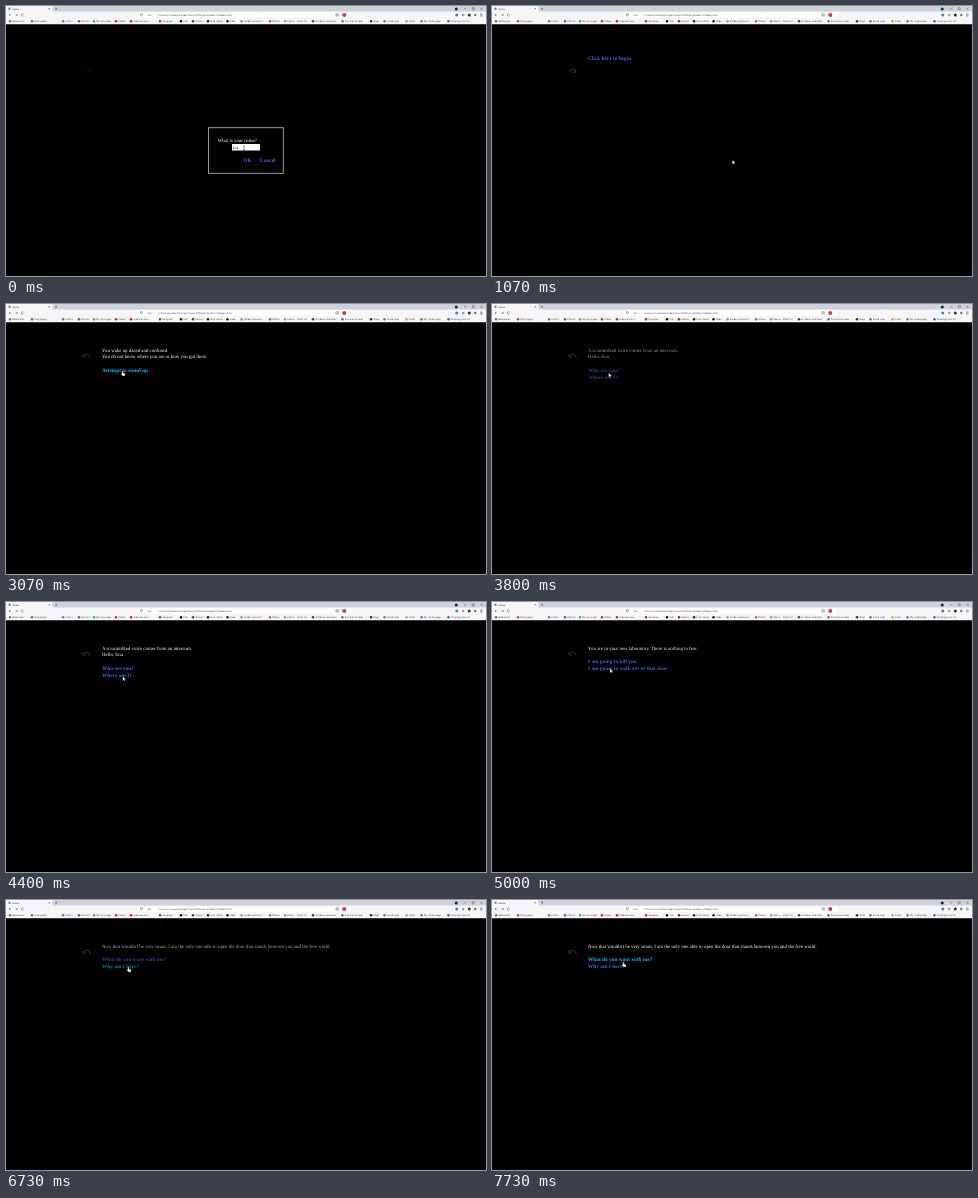
An HTML page for the animation above (8000 ms loop, 480 by 270 pixels).

```html
<!DOCTYPE html>
<html lang="en">
<head>
<meta charset="utf-8">
<style>
html, body { margin: 0; width: 100%; height: 100%; overflow: hidden; background: #000; }
svg { display: block; width: 100%; height: 100%; text-rendering: geometricPrecision; }
.story { font: 19.5px "Liberation Serif", serif; fill: #fff; }
.link { font-size: 21.4px; font-weight: bold; fill: #4169e1; }
.hover { fill: #00bfff; }
.ui { font: 9.3px Inter, sans-serif; fill: #444; }
.line { fill: none; stroke: #555; stroke-width: 2; }
.icon { fill: none; stroke: #484848; stroke-width: 2.6; }
</style>
</head>
<body>
<svg viewBox="0 0 1920 1080">
  <rect width="1920" height="1080"/>
  <g class="ui" id="browser">
    <rect width="1920" height="24" fill="#d0d0dc"/>
    <rect width="186" height="24" fill="#f6f6f9"/>
    <rect y="22" width="1920" height="51" fill="#f6f6f9"/>
    <rect x="528" y="26" width="852" height="21" rx="4" fill="#fff"/>
    <circle cx="14" cy="11" r="5" fill="#889"/>
    <text x="24" y="15">Hollow</text>
    <path class="line" d="M170 8l6 6m0-6l-6 6M196 11h9m-4.500-4.500v9M1832 11h9M1865 7h8v8h-8zM1898 7l8 8m0-8l-8 8"/>
    <circle cx="1801" cy="12" r="6" fill="#222"/>
    <path class="line" d="M20 36h-8m4-4l-4 4 4 4M38 36h8m-4-4l4 4-4 4M70 33a5 5 0 1 0 0 6M538 31h7v6l-3.500 4-3.500-4z"/>
    <text x="566" y="40">File</text>
    <text x="608" y="40">C:/Users/marlow/Desktop/Twine%20Stories/Hollow%20Room.html</text>
    <path class="line" d="M1320 31h9v10l-4.500-3-4.500 3z"/>
    <circle cx="1353" cy="36" r="8" fill="#d33a3a"/>
    <circle cx="1803" cy="36" r="6" fill="#3b82d0"/>
    <circle cx="1829" cy="36" r="5" fill="#999"/>
    <circle cx="1853" cy="36" r="6" fill="#333"/>
    <circle cx="1877" cy="36" r="5" fill="#777"/>
    <path class="line" d="M1896 32h10m-10 4h10m-10 4h10"/>
  </g>
  <g class="story">
    <g id="scenes"></g>
    <path id="redo" class="icon" d="M308 266Q312 252 322 252T334 264M335 253v12h-12"/>
    <path id="undo" class="icon" d="M309 210Q317 200 325 201T338 217M308 200v12h12"/>
  </g>
  <g id="cursor" stroke="#000">
    <path id="arrow" fill="#fff" d="M0 0v17l4-4 3 6 3-1-3-6h6z"/>
    <path id="hand" fill="#fff" d="M0 0q3 0 3 3v5l7 2q2 1 1 5l-2 5h-9l-6-8q1-3 4-1v-10q0-1 2-1z"/>
    <path id="beam" fill="none" stroke-width="2" d="M-3-8h6M0-8v16M-3 8h6"/>
  </g>
</svg>
<script>
const LOOP = 8000, FADE = 800;
const $ = id => document.getElementById(id);

function add(parent, tag, attrs, text = "") {
  const el = document.createElementNS("http://www.w3.org/2000/svg", tag);
  for (const k in attrs) el.setAttribute(k, attrs[k]);
  el.textContent = text;
  return parent.appendChild(el);
}

const bookmarks = [
  [16, "#777", "Bookmarks"], [104, "#c44", "Daily pages"], [228, "#48a", "Letters"],
  [292, "#55c", "Planner"], [352, "#3b5", "My messages"], [440, "#d22", "Videos"],
  [500, "#d22", "Video lessons"], [616, "#d22", "Song box"], [700, "#111", "Talk"],
  [748, "#922", "Comics"], [808, "#222", "Free stories"], [886, "#222", "Code"],
  [942, "#999", "Garden planner 2"], [1056, "#c55", "Photos"], [1116, "#999", "Poems - Short list"],
  [1228, "#444", "Art ideas and notes"], [1346, "#669", "Summer of code"], [1460, "#333", "Shop"],
  [1514, "#494", "Island map"], [1602, "#e93", "Cards"], [1662, "#48a", "My studio page"],
  [1770, "#36c", "Drawing class list"]
];
for (const [x, fill, label] of bookmarks) {
  add($("browser"), "circle", { cx: x, cy: 61, r: 5, fill });
  add($("browser"), "text", { x: x + 9, y: 64 }, label);
}

// Each scene: start time, then [row, text, isLink]
const scenes = [
  [0],
  [480, [1, "Click here to begin", 1]],
  [2070, [0, "You wake up dazed and confused."],
    [1, "You do not know where you are or how you got there."],
    [3, "Attempt to stand up", 1]],
  [3530, [0, "A scrammbled voice comes from an intercom."], [1, "Hello, Ena."],
    [3, "Who are you?", 1], [4, "Where am I?", 1]],
  [4450, [0, "You are in your new laboratory. There is nothing to fear."],
    [2, "I am going to kill you", 1], [3, "I am going to walk out of that door", 1]],
  [6420, [0, "Now that wouldn't be very smart. I am the only one able to open the door that stands between you and the free world."],
    [2, "What do you want with me?", 1], [3, "Why am I here?", 1]]
].map(([start, ...lines]) => {
  const g = add($("scenes"), "g", {}), links = [];
  for (const [row, text, isLink] of lines) {
    const el = add(g, "text", { x: 384, y: 190 + row * 27 }, text);
    if (isLink) links.push(el);
  }
  return { start, g, links };
});

const dialog = scenes[0].g;
add(dialog, "rect", { x: 810, y: 487, width: 299, height: 182, fill: "#000", stroke: "#ccc", "stroke-width": 3 });
add(dialog, "text", { x: 847, y: 543 }, "What is your name?");
add(dialog, "rect", { x: 904, y: 552, width: 112, height: 26, fill: "#fff" });
add(dialog, "text", { x: 908, y: 570, fill: "#000", style: "font-size:13.3px" }, "Ena");
add(dialog, "text", { x: 949, y: 625, class: "link" }, "OK");
add(dialog, "text", { x: 1015, y: 625, class: "link" }, "Cancel");

// Pointer path: time, x, y, hovered link (-1 for none)
const path = [
  [0, 238, 142, -1], [330, 238, 142, -1], [470, 240.3, 154, -1], [1200, 240.3, 154, -1],
  [1900, 118, 52, 0], [2070, 118, 52, -1], [2930, 116.3, 65, 0], [3070, 116.5, 67, 0],
  [3530, 116.5, 67, -1], [4330, 116.8, 74.5, -1], [4420, 116.8, 74.5, 1], [4450, 116.8, 74.5, -1],
  [5100, 118, 66, 1], [5400, 119.5, 61, 0], [5580, 119.5, 61, 0], [5680, 121, 64, 1],
  [5800, 122.3, 67, 1], [7200, 122.3, 67, 1], [7450, 127, 64, 0], [7730, 131.3, 62, 0],
  [LOOP, 131.3, 62, 0]
];

// CSS "ease" curve, solved by bisection
function ease(p) {
  if (p >= 1) return 1;
  const bez = (a, b, s) => 3 * a * s * (1 - s) ** 2 + 3 * b * s * s * (1 - s) + s ** 3;
  let lo = 0, hi = 1;
  for (let i = 0; i < 20; i++) {
    const mid = (lo + hi) / 2;
    if (bez(.25, .25, mid) < p) lo = mid; else hi = mid;
  }
  return bez(.1, 1, lo);
}

const show = (el, on) => el.style.display = on ? "" : "none";

function draw(t) {
  const current = scenes.findLastIndex(s => t >= s.start);
  const k = path.findLastIndex(p => t >= p[0]);
  const [t0, x0, y0, hover] = path[k], [t1, x1, y1] = path[k + 1];
  const p = (t - t0) / (t1 - t0), e = p * p * (3 - 2 * p);

  scenes.forEach((s, i) => {
    show(s.g, i === current);
    s.g.style.opacity = i ? ease((t - s.start) / FADE) : 1;
    s.links.forEach((el, j) => el.setAttribute("class", j === hover ? "link hover" : "link"));
  });
  show($("redo"), current < 2);
  $("redo").style.opacity = current ? 1 : .3;
  show($("undo"), current > 1);

  const inField = t < 380;
  show($("beam"), inField);
  show($("hand"), hover >= 0);
  show($("arrow"), !inField && hover < 0);
  $("cursor").setAttribute("transform", `translate(${4 * (x0 + (x1 - x0) * e)} ${4 * (y0 + (y1 - y0) * e)})`);
}

const begin = performance.now();
function tick() {
  draw((performance.now() - begin) % LOOP);
  requestAnimationFrame(tick);
}
tick();
</script>
</body>
</html>
```
